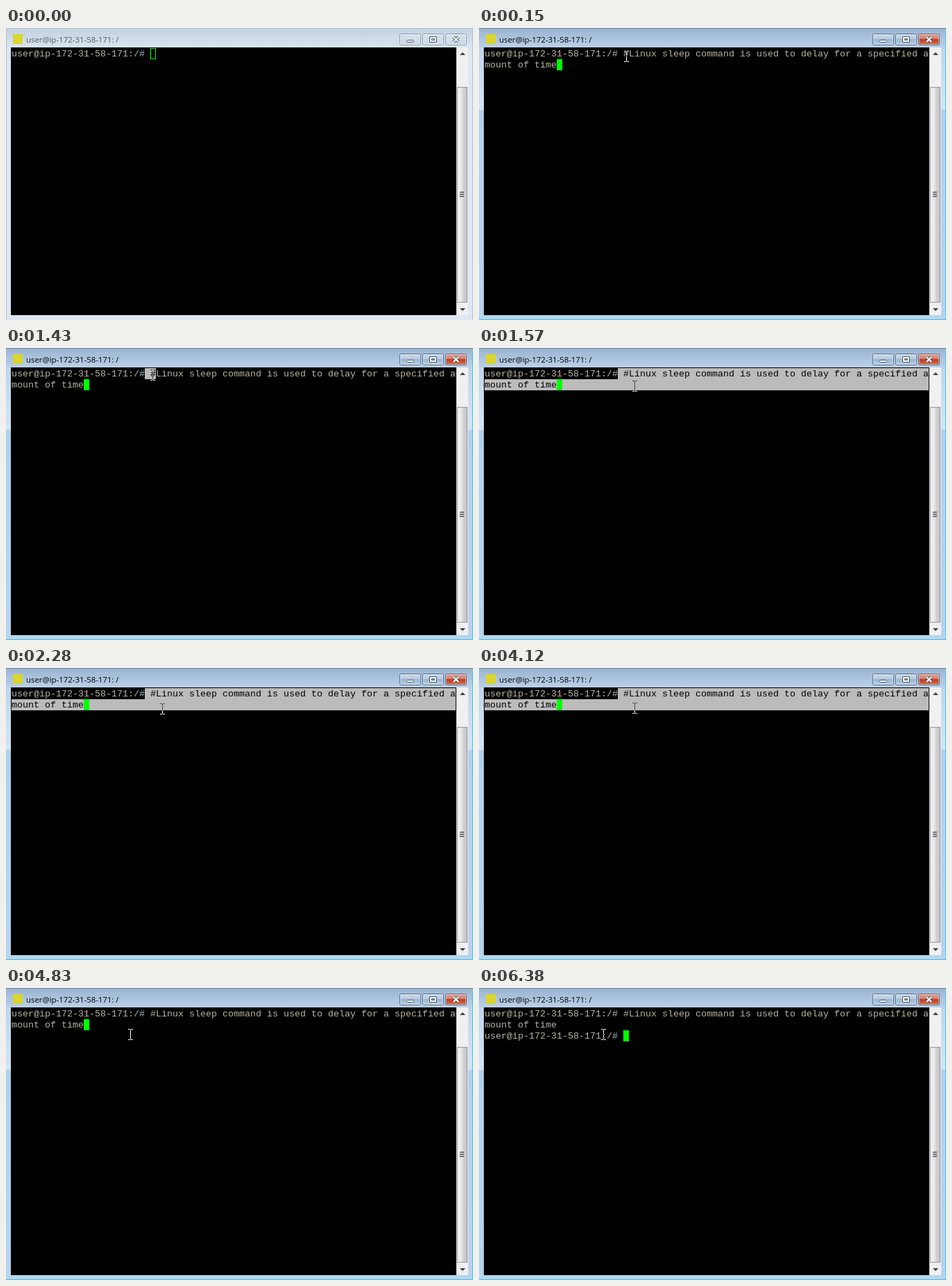
Recreate the animation shown at these times as an HTML page. Size 673 px wide and 421 px high, loop 8 s.

```html
<!DOCTYPE html>
<html lang="en">
<head>
<meta charset="utf-8">
<title>Terminal</title>
<style>
  html, body { margin: 0; width: 100%; height: 100%; overflow: hidden; background: #dce7f3; }
  svg { display: block; width: 673px; height: 421px; }
  text { white-space: pre; }
  .title { font: 11.4px "Open Sans", "Noto Sans", sans-serif; }
  .term { font: 13.333px "Liberation Mono", "DejaVu Sans Mono", monospace; fill: #bbb3a3; }
  .term .hash { fill: #a6bccd; }
  .term.dark { fill: #000; }
  .sel { fill: #bbb; }
  .cursor { fill: #0f0; }
  .crisp { shape-rendering: crispEdges; }
  #pointer { mix-blend-mode: difference; }
</style>
</head>
<body>
<svg id="stage" viewBox="0 0 673 421">
  <defs>
    <linearGradient id="idleBar" x2="0" y2="1">
      <stop stop-color="#c3d0de"/><stop offset="1" stop-color="#d8e4f0"/>
    </linearGradient>
    <linearGradient id="liveBar" x2="0" y2="1">
      <stop stop-color="#9ab4d0"/><stop offset="1" stop-color="#b9d0e8"/>
    </linearGradient>
    <linearGradient id="liveSide" x2="0" y2="1">
      <stop stop-color="#b9d0e8"/><stop offset=".28" stop-color="#d4e5f5"/>
      <stop offset=".28" stop-color="#b2d0ec"/><stop offset="1" stop-color="#b9d4ee"/>
    </linearGradient>
    <linearGradient id="idleButton" x2="0" y2="1">
      <stop stop-color="#d7e1ec"/><stop offset="1" stop-color="#cbd8e6"/>
    </linearGradient>
    <linearGradient id="liveButton" x2="0" y2="1">
      <stop stop-color="#c9d9ea"/><stop offset=".48" stop-color="#b6cadf"/>
      <stop offset=".5" stop-color="#9bb5d0"/><stop offset="1" stop-color="#b7d0e8"/>
    </linearGradient>
    <linearGradient id="closeButton" x2="0" y2="1">
      <stop stop-color="#e3a497"/><stop offset=".48" stop-color="#d2796a"/>
      <stop offset=".5" stop-color="#bd3b24"/><stop offset="1" stop-color="#d5714e"/>
    </linearGradient>
    <linearGradient id="thumb">
      <stop stop-color="#f5f5f5"/><stop offset=".45" stop-color="#e6e6e8"/>
      <stop offset=".55" stop-color="#d4d4d7"/><stop offset="1" stop-color="#c3c3c7"/>
    </linearGradient>
  </defs>

  <g id="idle">
    <rect width="673" height="421" fill="#dce7f3"/>
    <rect width="673" height="28" fill="url(#idleBar)"/>
    <path d="M.5 421V.5H672.5V421" fill="none" stroke="#b4c0cc"/>
  </g>
  <g id="live">
    <rect width="673" height="421" fill="url(#liveSide)"/>
    <rect width="673" height="28" fill="url(#liveBar)"/>
    <path d="M0 .5H673" stroke="#6f8296"/>
    <path d="M672.5 4V420.5H0" fill="none" stroke="#3cc4ea"/>
  </g>

  <rect x="10" y="9" width="14" height="14" fill="#d9d52e"/>

  <g class="crisp">
    <rect x="7" y="28" width="642" height="386" fill="#000"/>
    <rect x="649" y="28" width="17" height="386" fill="#f0f0f0"/>
    <rect x="650.5" y="85.5" width="14" height="310" rx="1" fill="url(#thumb)" stroke="#97979b"/>
    <path d="M654 236.5h6M654 239.5h6M654 242.5h6" stroke="#4c4c50"/>
    <path d="M654 237.5h6M654 240.5h6M654 243.5h6" stroke="#a0a0a4"/>
  </g>
  <path d="M654 39l4-4 4 4zM654 404l4 4 4-4z" fill="#404044"/>

  <g id="screen"></g>
  <path id="pointer" class="crisp" fill="#fff"
    d="M0 0h3v1h-3zM4 0h3v1h-3zM3 1h1v14h-1zM0 15h3v1h-3zM4 15h3v1h-3z"/>
</svg>

<script>
const LOOP = 8000;
const CELL = 8, ROW = 16, LEFT = 8, TOP = 29;
const HOST = 'user@ip-172-31-58-171:';
const FIRST = '#Linux sleep command is used to delay for a specified a';
const SECOND = 'mount of time';

const byId = id => document.getElementById(id);
const screen = byId('screen');
const colX = col => LEFT + col * CELL;
const rowY = row => TOP + row * ROW;

function group(parent, markup) {
  const g = document.createElementNS('http://www.w3.org/2000/svg', 'g');
  g.innerHTML = markup;
  parent.append(g);
  return g;
}
const text = (col, row, string, dark = '') =>
  `<text class="term ${dark}" x="${colX(col)}" y="${rowY(row) + 12}">${string}</text>`;
const block = (col, row, cells, kind) =>
  `<rect class="${kind} crisp" x="${colX(col)}" y="${rowY(row)}" width="${cells * CELL}" height="${ROW}"/>`;
const prompt = row => text(0, row, `${HOST}/<tspan class="hash">#</tspan>`);

// Title and window buttons, in the unfocused and focused looks
function windowLabels(parent, ink, edge, fill, closeFill, glyph) {
  const button = (x, paint) =>
    `<rect x="${x + .5}" y="8.5" width="30" height="16" rx="2" fill="${paint}" stroke="${edge}"/>
     <rect x="${x + 1.5}" y="9.5" width="28" height="14" rx="1" fill="none" stroke="#fff" stroke-opacity=".45"/>`;
  const cross = (color, width) =>
    `<path d="M645 13l7 7M652 13l-7 7" stroke="${color}" stroke-width="${width}"/>`;
  group(parent, `
    <text class="title" x="29" y="21" fill="${ink}">${HOST} /</text>
    ${button(567, fill)}${button(600, fill)}${button(633, closeFill)}
    <g fill="${glyph}" stroke="#4d5866">
      <rect x="577.5" y="17.5" width="10" height="3" rx="1"/>
      <path fill-rule="evenodd" d="M610.5 12.5h10v8h-10zM613.5 15.5h4v2h-4z"/>
    </g>
    ${cross('#4d5866', 4.2)}${cross(glyph, 2.2)}`);
}
windowLabels(byId('idle'), '#555b62', '#8e9caf', 'url(#idleButton)', 'url(#idleButton)', '#f0f4f8');
windowLabels(byId('live'), '#000', '#57708d', 'url(#liveButton)', 'url(#closeButton)', '#fff');

group(screen, prompt(0));
const hollowCursor = group(screen,
  `<rect class="crisp" x="${colX(25) + .5}" y="${TOP + .5}" width="7" height="15" fill="none" stroke="#0f0"/>`);
const command = group(screen, text(25, 0, FIRST) + text(0, 1, SECOND));
const smallSelection = group(screen, block(24, 0, 2, 'sel') + text(25, 0, '#', 'dark'));
const fullSelection = group(screen,
  block(24, 0, 56, 'sel') + block(0, 1, 80, 'sel') +
  text(25, 0, FIRST, 'dark') + text(0, 1, SECOND, 'dark'));
const typingCursor = group(screen, block(13, 1, 1, 'cursor'));
const nextPrompt = group(screen, prompt(2) + block(25, 2, 1, 'cursor'));

function play(element, property, steps) {
  const frames = steps.map(([time, value]) =>
    ({ offset: time / LOOP, [property]: value, easing: 'steps(1, end)' }));
  frames.push({ offset: 1, [property]: steps.at(-1)[1] });
  element.animate(frames, { duration: LOOP, iterations: Infinity });
}
function showBetween(element, from, to = LOOP) {
  const steps = [[from, 'visible']];
  if (from > 0) steps.unshift([0, 'hidden']);
  if (to < LOOP) steps.push([to, 'hidden']);
  play(element, 'visibility', steps);
}

showBetween(byId('idle'), 0, 150);
showBetween(byId('live'), 150);
showBetween(hollowCursor, 0, 150);
showBetween(command, 150);
showBetween(smallSelection, 1430, 1570);
showBetween(fullSelection, 1570, 4830);
showBetween(typingCursor, 150, 6380);
showBetween(nextPrompt, 6380);
showBetween(byId('pointer'), 150);

const pointerPath = [
  [0, 209, 33], [300, 206, 29], [430, 205, 27], [580, 205, 26], [1430, 208, 31],
  [1570, 221, 47], [1730, 222, 52], [2280, 222, 51], [4120, 221, 50],
  [4270, 203, 52], [4420, 181, 58], [4540, 176, 59],
];
play(byId('pointer'), 'transform',
  pointerPath.map(([time, x, y]) => [time, `translate(${x}px, ${y}px)`]));
</script>
</body>
</html>
```
